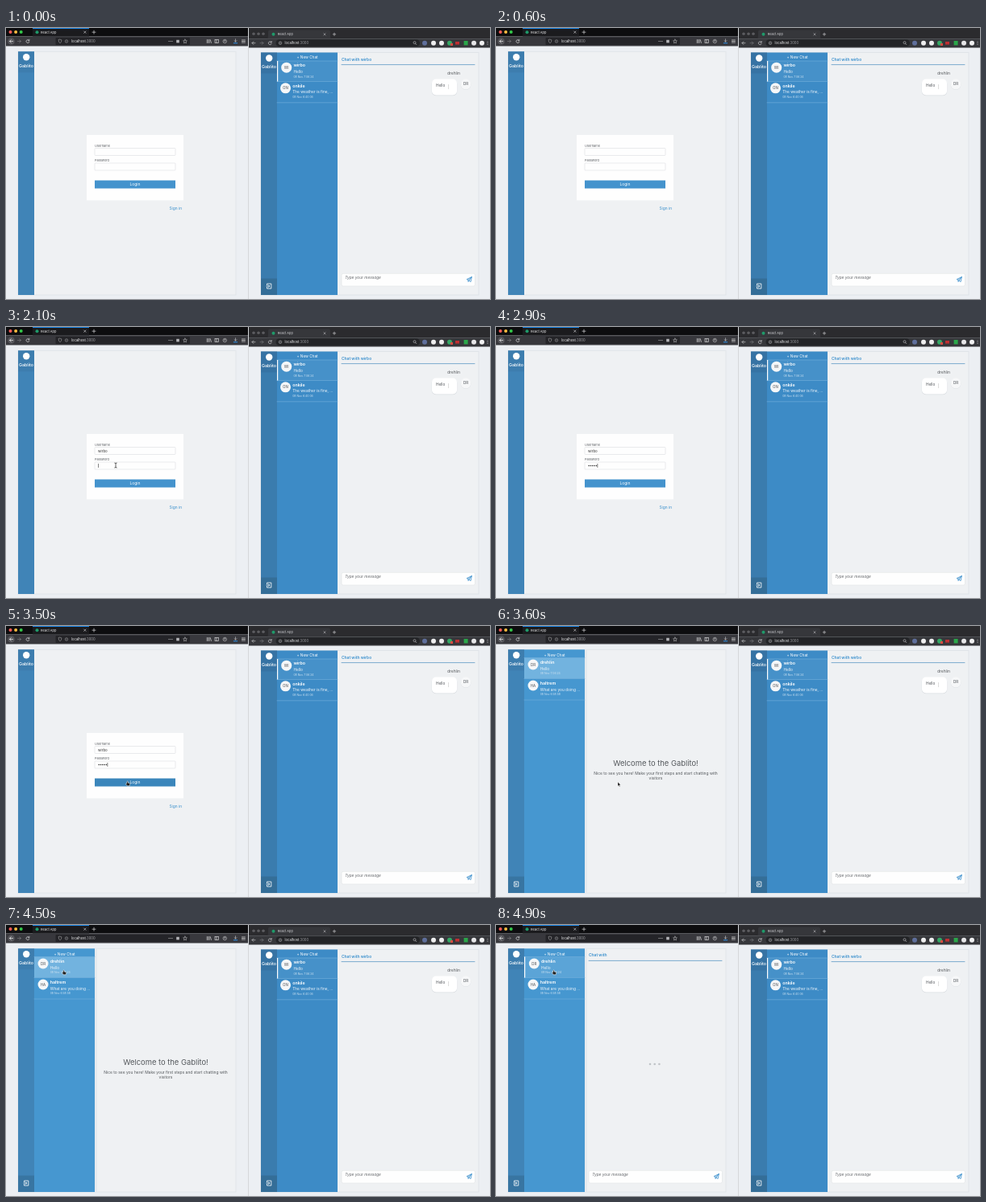
Write an HTML page that moves like this. It is 600 px wide and 337 px high and loops after 5 s.

```html
<!DOCTYPE html>
<html lang="en">
<head>
<meta charset="utf-8">
<title>Chat demo</title>
<style>
  html, body { margin: 0; width: 100%; height: 100%; overflow: hidden; background: #eceff2; }
  svg { display: block; width: 100vw; height: 100vh; }
  text { font-family: Inter, Roboto, sans-serif; }
  .line { fill: none; stroke-linecap: round; stroke-linejoin: round; }
</style>
</head>
<body>
<svg id="stage" viewBox="0 0 600 337"></svg>
<script>
const BLUE = '#3b90cd';
const APP = 'Gablito';
const stage = document.getElementById('stage');

const rect = (x, y, w, h, fill, more = '') =>
  `<rect x="${x}" y="${y}" width="${w}" height="${h}" fill="${fill}" ${more}/>`;
const circle = (x, y, r, fill, more = '') =>
  `<circle cx="${x}" cy="${y}" r="${r}" fill="${fill}" ${more}/>`;
const line = (d, color, width = .7, more = '') =>
  `<path class="line" d="${d}" stroke="${color}" stroke-width="${width}" ${more}/>`;
const text = (x, y, size, str, fill, more = '') =>
  `<text x="${x}" y="${y}" font-size="${size}" fill="${fill}" ${more}>${str}</text>`;
const group = (id, body, more = '') => `<g id="${id}" ${more}>${body}</g>`;
const MID = 'text-anchor="middle"';
const BOLD = 'font-weight="600"';

const cross = (x, y, r, c) => line(`M${x - r} ${y - r}l${2 * r} ${2 * r}m0 ${-2 * r}l${-2 * r} ${2 * r}`, c, .6);
const plus = (x, y, r, c) => line(`M${x - r} ${y}h${2 * r}M${x} ${y - r}v${2 * r}`, c);
const arrow = (x, y, dir, c) =>
  line(`M${x - 2 * dir} ${y}h${4 * dir}m${-1.8 * dir} -1.8l${1.8 * dir} 1.8l${-1.8 * dir} 1.8`, c);
const reload = (x, y, c) =>
  line(`M${x + 1.7} ${y - 1}a2 2 0 1 0 .2 1.8M${x + 1.9} ${y - 2.3}v1.6h-1.6`, c);
const info = (x, y, c) =>
  circle(x, y, 1.8, 'none', `stroke="${c}" stroke-width=".5"`) + line(`M${x} ${y}v.8M${x} ${y - .9}v.1`, c, .5);

function leftBrowser() {
  const c = '#d4d4d6';
  return rect(0, 0, 300, 10.5, '#0d0d0f') +
    rect(0, 10.5, 300, 12, '#38383d') +
    ['#fc5b57', '#fdbc40', '#34c84a'].map((f, i) => circle(5.5 + 6.6 * i, 5, 2, f)).join('') +
    rect(33, 0, 70, 10.5, '#1b1b1e') + rect(33, 0, 70, 1, '#1a86e8') +
    circle(38.5, 5.3, 2, '#1f9a6a') +
    text(43, 6.7, 4, 'React App', '#e9e9ea') +
    cross(97.8, 5.2, 1.2, '#e0e0e2') + plus(109, 5.2, 2, '#d5d5d7') +
    circle(6.5, 16.5, 4.3, '#56565b') + arrow(6.5, 16.5, -1, '#f2f2f3') +
    arrow(16.5, 16.5, 1, '#77777b') + reload(27, 16.5, c) +
    rect(61.5, 12, 166.5, 9, '#242428', 'rx="1"') +
    line('M67 14.2l1.9.7q0 3-1.9 4q-1.9-1-1.9-4z', '#a4a4a7', .6) +
    info(75, 16.5, '#a4a4a7') +
    text(81, 18.1, 4.2, 'localhost<tspan fill="#a9a9ad">:3000</tspan>', '#f2f2f3') +
    [202, 204, 206].map(x => circle(x, 16.5, .55, c)).join('') +
    rect(211.2, 14.8, 3.6, 3.6, '#b4b4b8') +
    line('M222 14.1l.7 1.6l1.7.2l-1.3 1.2l.4 1.8l-1.5-.9l-1.5.9l.4-1.8l-1.3-1.2l1.7-.2z', c, .5) +
    line('M249.2 14.5v4M250.7 14.5v4M252.2 14.5v4M253.3 14.7l1.2 3.8', c, .7) +
    rect(259, 14.6, 4.6, 3.9, 'none', `stroke="${c}" stroke-width=".7"`) + line('M261 14.8v3.5', c) +
    circle(271.3, 16.5, 2.2, 'none', `stroke="${c}" stroke-width=".6"`) + circle(271.3, 16, .8, c) +
    line('M284.5 13.8v3.2m-1.4-1.3l1.4 1.4l1.4-1.4', c, .6) + line('M282.3 18.8h4.4', '#2b8fe8', 1) +
    line('M292.4 14.9h4M292.4 16.5h4M292.4 18.1h4', c, .7);
}

function rightBrowser() {
  const c = '#c4c5c8';
  const icons = [[519, '#5f6f9c'], [530, '#eeeeef'], [540, '#eeeeef'], [550, '#35a764'],
    [580, '#e6e6e8'], [590, '#f1f1f2']];
  return rect(301, 0, 299, 13.2, '#2b2b2e') +
    rect(301, 13.2, 299, 11.3, '#36373b') +
    [307, 313, 319].map(x => circle(x, 7.3, 1.8, '#5c5c60')).join('') +
    '<path d="M323 13.3q2 0 2-3V4.5q0-2 2-2h73q2 0 2 2v5.8q0 3 2 3z" fill="#36373b"/>' +
    circle(331.5, 7.8, 2, '#1f9a6a') +
    text(336.8, 9.2, 3.9, 'React App', '#d2d3d6') +
    cross(395, 7.8, 1.1, c) + plus(407, 7.8, 1.7, c) +
    arrow(307, 18.7, -1, c) + arrow(317, 18.7, 1, '#77787c') + reload(327.3, 18.7, c) +
    rect(334.5, 14.3, 178.5, 8.8, '#232427', 'rx="4.4"') +
    info(340, 18.7, c) +
    text(345.5, 20.2, 4.2, 'localhost<tspan fill="#9c9da1">:3000</tspan>', '#e8e9eb') +
    circle(506.5, 18.2, 1.5, 'none', `stroke="${c}" stroke-width=".6"`) + line('M507.6 19.4l1.2 1.2', c) +
    icons.map(([x, f]) => circle(x, 18.7, 3, f)).join('') +
    rect(551, 19, 3, 3, '#d94b42') + rect(557, 17, 5, 3.6, '#bf2f33') + rect(567.6, 16, 5, 5.4, '#2aa74a') +
    [17, 18.7, 20.4].map(y => circle(597, y, .5, c)).join('');
}

const avatar = (x, y, who) =>
  circle(x, y, 6.5, '#f6f7f8') + text(x, y + 1.6, 4.5, who.slice(0, 2).toUpperCase(), '#4b4f54', MID);

function chatItem(x, y, who, msg, time) {
  return avatar(x, y, who) +
    text(x + 8.7, y - 1.1, 5.3, who, '#fff', BOLD) +
    text(x + 8.7, y + 6.6, 4.8, msg, '#f0f6fb') +
    text(x + 8.7, y + 12.3, 3.45, '08 Nov ' + time, '#cfe3f2');
}

const rail = (x, y, color, dark) =>
  rect(x, y, 20, 332 - y, color) + rect(x, y, 20, 26, dark, 'opacity=".6"') +
  circle(x + 10.2, y + 7, 4.2, '#fff') +
  text(x + 10, y + 19.8, 5.4, APP, '#fff', MID + ' font-weight="500"');

const logout = (x, dark) =>
  rect(x, 311.5, 20, 20.5, dark, 'opacity=".7"') +
  line(`M${x + 7.5} 319.6v-1.6h5.3v6h-5.3v-1.6M${x + 7} 321h3.7m-1.3-1.4l1.4 1.4l-1.4 1.4`, '#fff', .8);

const composer = x =>
  rect(x, 305.3, 165.5, 15.7, '#fefefe', 'rx="2" stroke="#dfe2e5" stroke-width=".6"') +
  text(x + 4.2, 312.3, 4.8, 'Type your message', '#66696d', 'font-style="italic"') +
  line(`M${x + 155.4} 312.4l6-2.9l-1.3 6.1l-2-1.5l-1 1.5l-.2-2.2zM${x + 156.9} 313.4l4.4-3.8l-3.2 4.4`, BLUE, .8);

const header = (x, y, str) =>
  text(x, y, 4.9, str, BLUE, BOLD) + line(`M${x} ${y + 5.1}h165`, '#5f99c4', .8);

const separators = (x, ys) => line(ys.map(y => `M${x} ${y}h75`).join(''), '#75b1dc', .6);

function rightApp() {
  return rect(316, 30.5, 270, 301.5, '#eff1f3', 'stroke="#dfe3e8" stroke-width="1"') +
    rail(316, 30.5, '#3a7cae', '#356f9e') + logout(316, '#32698f') +
    rect(336, 30.5, 75, 301.5, '#3d8bc6') +
    text(373.5, 38.4, 4.7, '+ New Chat', '#fff', MID) +
    rect(336, 41, 75, 25.5, '#4691c9') + separators(336, [41, 66.5, 92.8]) +
    rect(336, 41, 1.2, 25.5, '#fff') +
    chatItem(347.7, 49.2, 'wirbo', 'Hello', '7:06:24') +
    chatItem(346.5, 74.8, 'onkile', 'The weather is fine, ...', '6:40:06') +
    header(416, 40.5, 'Chat with wirbo') +
    text(563, 57.6, 5, 'drehlin', '#55585c', 'text-anchor="end"') +
    rect(527.8, 64.3, 31.4, 20, '#d9dde1', 'rx="5"') + rect(528, 63.5, 31, 20, '#fff', 'rx="5"') +
    text(533, 73.3, 4.7, 'Hello', '#4b4f54') +
    [71, 73, 75].map(y => circle(548.7, y, .45, '#777')).join('') +
    circle(570, 70.3, 6.5, '#dde1e5') + avatar(570, 69.8, 'drehlin') +
    composer(416);
}

const field = (y, label) =>
  text(110, y - 2, 3.9, label, '#606468') +
  rect(110, y, 100, 9, '#fefefe', 'stroke="#dcdee1" stroke-width=".6" rx=".8"');

function login() {
  return rect(100, 133, 120, 81.3, '#fefefe') +
    field(149.5, 'Username') + field(168, 'Password') +
    '<text id="user" x="114" y="155.5" font-size="4.4" fill="#333"></text>' +
    [0, 1, 2, 3, 4].map(i => circle(115.2 + 2.3 * i, 172.5, .8, '#333', 'class="dot"')).join('') +
    '<rect id="caret" width=".6" height="5" fill="#333"/>' +
    '<rect id="button" x="110" y="189.5" width="100" height="10"/>' +
    text(160, 196.3, 5, 'Login', '#fff', MID) +
    text(218, 225.6, 4.85, 'Sign in', BLUE, 'text-anchor="end"');
}

function messenger() {
  const c = '#54585c';
  return logout(15, '#356f9b') +
    rect(35, 29.3, 75, 302.7, '#4697d0') + rect(110, 29.3, 3, 302.7, '#e6eaee') +
    text(72.5, 37.8, 4.7, '+ New Chat', '#fff', MID) +
    '<rect id="active" x="35" y="39.5" width="75" height="26"/>' +
    separators(35, [39.5, 65.5, 92]) +
    group('first', chatItem(46, 48, 'drehlin', 'Hello', '7:06:24')) +
    chatItem(46, 74, 'haltrem', 'What are you doing ...', '6:58:58') +
    group('welcome',
      text(198, 173.5, 9.4, `Welcome to the ${APP}!`, c, MID) +
      text(198, 185, 4.95, 'Nice to see you here! Make your first steps and start chatting with', c, MID) +
      text(198, 191, 4.95, 'visitors', c, MID)) +
    group('chat',
      rect(35, 39.5, 1.2, 26, '#fff') + header(115, 39.3, 'Chat with') +
      [191, 196.7, 202.4].map(x => circle(x, 173, 1.3, '#bfc3c7', 'class="load"')).join('') +
      composer(115));
}

function cursors() {
  return group('beam', line('M-1.2 -3q1.2 0 1.2.6q0-.6 1.2-.6M0-2.6v5.2M-1.2 3q1.2 0 1.2-.6q0 .6 1.2.6', '#222', .7)) +
    group('pointer', '<path d="M0-2v5.2l1.2-1.1l.8 1.8l.8-.4l-.8-1.7h1.6z" fill="#111" stroke="#fff" stroke-width=".4"/>') +
    group('hand', '<path d="M-1-2.6q.7-.7 1.2 0v1.6l2.1.5q.6.3.4 1.3l-.5 2h-3l-1.7-2.2q0-.9.9-.5z" fill="#222" stroke="#fff" stroke-width=".5"/>');
}

stage.innerHTML =
  rect(0, 0, 600, 337, '#eceff3') + leftBrowser() + rightBrowser() +
  rect(300, 0, 1, 337, '#d5d7da') +
  rect(15, 29.3, 270, 302.7, '#eff1f3', 'stroke="#e1e5e9" stroke-width="1"') +
  rail(15, 29.3, '#4084b7', '#3b78a8') +
  group('login', login()) + group('messenger', messenger()) +
  rightApp() + cursors();

const el = id => document.getElementById(id);
const show = (node, on) => node.setAttribute('visibility', on ? 'inherit' : 'hidden');
const dots = stage.querySelectorAll('.dot');
const loaders = stage.querySelectorAll('.load');

// Mouse path: time, x, y
const PATH = [[700, 236, 200], [1200, 127, 157], [1700, 127, 157], [1900, 136.5, 175], [2100, 136, 172],
  [2900, 136, 172], [3500, 151, 196], [4100, 151, 196], [4500, 72, 59], [5000, 72, 59]];

function mouse(t) {
  const i = Math.max(1, PATH.findIndex(p => p[0] >= t));
  const [a, b] = [PATH[i - 1], PATH[i]];
  const k = Math.max(0, (t - a[0]) / (b[0] - a[0]));
  const e = k * k * (3 - 2 * k);
  return [a[1] + (b[1] - a[1]) * e, a[2] + (b[2] - a[2]) * e];
}

function draw(t) {
  const inside = t >= 3600, opened = t >= 4700;
  const [x, y] = mouse(t);

  show(el('login'), !inside);
  show(el('messenger'), inside);
  show(el('welcome'), inside && !opened);
  show(el('chat'), opened);
  el('first').setAttribute('transform', `translate(${opened ? 1.3 : 0} 0)`);
  el('active').setAttribute('fill', opened ? '#5ba4d7' : '#72b3df');
  loaders.forEach(n => n.setAttribute('r', .7 + Math.max(0, t - 4700) * .003));

  const letters = t < 1500 ? 0 : t < 1600 ? 2 : t < 1700 ? 4 : 5;
  const typed = Math.max(0, Math.min(5, (t - 2300) / 100));
  el('user').textContent = 'wirbo'.slice(0, letters);
  dots.forEach((n, i) => show(n, !inside && i < typed));

  const inUser = t >= 1400 && t < 1900;
  show(el('caret'), !inside && t >= 1400);
  el('caret').setAttribute('x', inUser ? 114 + letters * 2.25 : 114 + typed * 2.32);
  el('caret').setAttribute('y', inUser ? 151.5 : 169.9);

  const overButton = !inside && t > 3000 && y > 189;
  el('button').setAttribute('fill', overButton ? '#3b86bb' : '#4493cd');

  const typing = (t >= 1400 && t < 1800) || (t >= 2400 && t < 3000);
  const visible = t >= 700 && !typing;
  const inField = !inside && x > 110 && x < 210 && ((y > 149 && y < 159) || (y > 168 && y < 178));
  const kind = inField ? 'beam' : overButton || (inside && x < 110) ? 'hand' : 'pointer';
  for (const id of ['beam', 'pointer', 'hand']) {
    show(el(id), visible && id === kind);
    el(id).setAttribute('transform', `translate(${x} ${y})`);
  }
}

const start = performance.now();
function tick() {
  draw(Math.floor((performance.now() - start) % 5000 / 100) * 100);
  requestAnimationFrame(tick);
}
tick();
</script>
</body>
</html>
```
